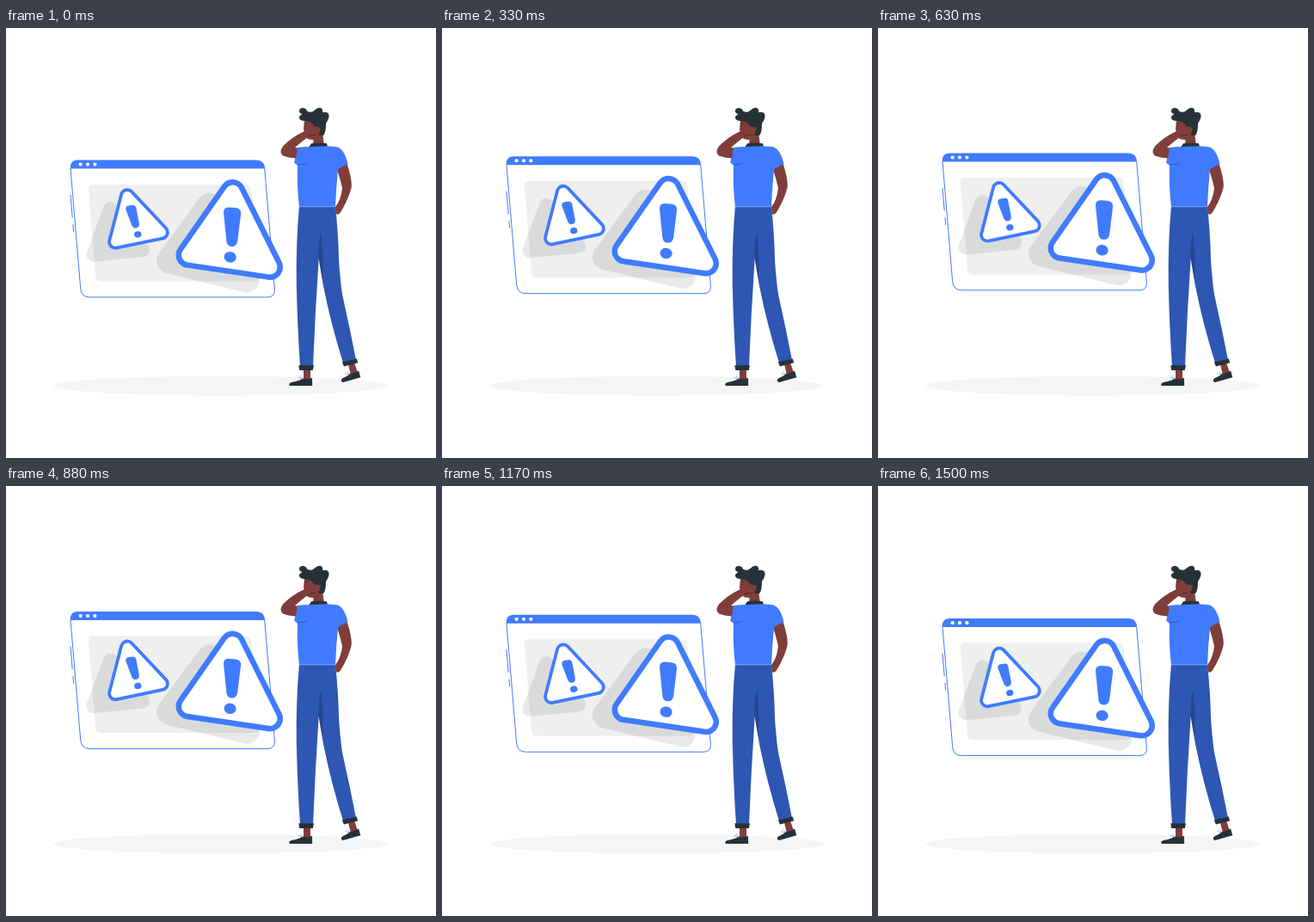
Write an HTML page that moves like this. It is 500 px wide and 500 px high and loops after 1.54 s.

```html
<!DOCTYPE html>
<html lang="en">
<head>
<meta charset="utf-8">
<title>Warning window</title>
<style>
  @property --step { syntax: "<number>"; inherits: false; initial-value: 0; }

  html, body { margin: 0; width: 100%; height: 100%; overflow: hidden; background: #fff; }
  svg { display: block; width: 100%; height: 100%; }

  /* Linear up and down by 10px, stepped at 24 pictures a second */
  .float {
    --d: calc(var(--step) - 17.5);
    transform: translateY(calc((max(var(--d), -1 * var(--d)) * 20 / 37 - 9.46) * 1px));
    animation: float 1540ms steps(37) -4ms infinite;
  }
  @keyframes float { from { --step: 0; } to { --step: 37; } }

  .blue { fill: #407bff; }
  .line { fill: none; stroke: #407bff; }
  .round { stroke-linejoin: round; }
  .rim { fill: #407bff; stroke: #407bff; }
  .face { fill: #fff; stroke: #fff; }
  .shadow { fill: #263238; stroke: #263238; opacity: .1; }
  .dark { fill: #263238; }
  .skin { fill: #7f3e3b; }
  .pants { fill: #2d57b3; }
  .shade { fill: #000; opacity: .2; }
</style>
</head>
<body>
<svg viewBox="0 0 500 500">
  <defs>
    <path id="small" d="M141 195.2 180.8 237.6 127.2 248.7Z"/>
    <path id="big" d="M263.5 191 307 278 212.5 264Z"/>
  </defs>

  <ellipse cx="249.5" cy="416" rx="194" ry="11.2" fill="#f5f5f5"/>

  <g class="float">
    <path class="line" fill="none" d="M75 163 86.7 303Q87.7 313 97 313H304Q313 313 312.4 304L300.7 163"/>
    <path class="blue" d="M74.7 163.5Q74.3 153.5 83 153.5H291.5Q300.3 153.5 301.2 163.5Z"/>
    <g fill="#fff">
      <circle cx="86.7" cy="158.6" r="2.1"/>
      <circle cx="95" cy="158.6" r="2.1"/>
      <circle cx="103.4" cy="158.6" r="2.1"/>
    </g>
    <path class="line" d="M75 194 77.2 220.5M77.9 228.5 78.7 237"/>
    <path fill="#efefef" d="M96 188Q95.5 182 101.5 182H279Q285 182 285.5 188L293.5 288.5Q294 294.5 288 294.5H110Q104.5 294.5 104 288.5Z"/>

    <path class="shadow round" stroke-width="17" d="M121.5 210.5 158.7 257.7 102 263.2Z"/>
    <path class="shadow round" stroke-width="30" d="M237 207 280 292.3 190 270.5Z"/>

    <use href="#small" class="rim round" stroke-width="18"/>
    <use href="#small" class="face round" stroke-width="10.4"/>
    <path class="blue" d="M139.3 211Q139 207.5 142.5 206.6L147 206Q150.5 205.6 151.3 209L154.8 227Q155.3 231.5 151.5 232.5 148 233.2 146.3 229.5Z"/>
    <ellipse class="blue" cx="153.3" cy="240" rx="4.2" ry="3.7" transform="rotate(-10 153.3 240)"/>

    <use href="#big" class="rim round" stroke-width="30"/>
    <use href="#big" class="face round" stroke-width="17"/>
    <path class="blue" d="M253 214.5Q253 208.3 259 208.4L267 209Q273.6 209.8 273.1 216L269.2 248Q268 254.4 262 254 257 253.4 256.4 248Z"/>
    <ellipse class="blue" cx="260.6" cy="266.4" rx="7.1" ry="6.2" transform="rotate(8 260.6 266.4)"/>
  </g>

  <g>
    <path class="skin" d="M346 397H354V409H346ZM398 391 405 389 409 401 401 404Z"/>
    <path class="dark" d="M345 407.5Q350 409 356 407L356.2 416H330Q327.5 413 333 411.8 341 410.5 345 407.5ZM400 402Q405 402 410 398.5L412.3 406.2 392 412Q388 410.5 391 407.5 397 405 400 402Z"/>
    <path class="line" stroke-width=".8" opacity=".7" d="M339.5 406 344 408.5M342 404 344.5 408.5M394 401.5 399 403M396.5 399 399.5 402.5"/>
    <path class="pants" d="M341 207H383Q386.5 240 387 270 389.5 303 391.5 312 400 350 407 386L392.2 390Q378 345 369 300 365 277 363.7 268 359.5 330 357 393.5L342 394Q339 350 337.8 300 337 250 341 207Z"/>
    <path class="shade" d="M366.5 236Q362.5 255 363.4 267L368 293Q369 262 366.5 236Z"/>
    <path class="dark" d="M340.3 392.3H358L356.8 398H341.3ZM390.8 388.5 407.8 384.5 409.2 389.3 393 393.5Z"/>

    <path class="skin" d="M385 163 396.5 157.5Q403 178 401.5 186 398 200 388.5 215 385.5 218 383.5 216L383 208Q389.5 200 391 186 388.5 175 384.5 163Z"/>
    <path class="skin" d="M347 108Q348 105 356 106H371L368.5 125 370 137H357L357.5 130Q350 130 348 126L346 118Z"/>
    <path class="dark" d="M352.5 138 355 134.2Q364 133 373 134.2L374 138.5Z"/>
    <path class="blue" d="M354 138Q346 138 339 139 336 148 335.3 157L339 159.5Q338 185 341 208H383Q384 185 386 164L397.5 158Q393.5 141 385 138.2L373 137.2Z"/>
    <path class="shade" d="M338.8 159.8Q347 160 351 156.5 345 158.5 338 158.3Z"/>
    <path stroke="#fff" stroke-width=".7" opacity=".5" d="M341 207.8H383"/>

    <path class="dark" d="M341 96.5Q341 93 345 93 349 93 350 96.5 355 99.5 359 95.5 362 92 366 92.8 369 95 368 98 376 97 375.6 103 375 107 372 111 372 122 369 125H364L360 116 356 111Q352 108.5 348 108.3 340 108 341 103 343 101 344.5 100 341 99 341 96.5Z"/>
    <path class="skin" d="M347 120Q332 127 322 137.5 317 144.5 322 148.5 328 151 337 151.3L339 139.5 336 139Q344 132 352 126L361 124.2Q366.5 122 365.5 115.5 355 113.5 351 117.5Z"/>
    <path fill="none" stroke="#4f2423" stroke-width=".8" d="M346.8 111.3 351 111.8M351 126 355 124.6 361 124.4M347.5 114.5H349.5"/>
  </g>
</svg>
</body>
</html>
```
